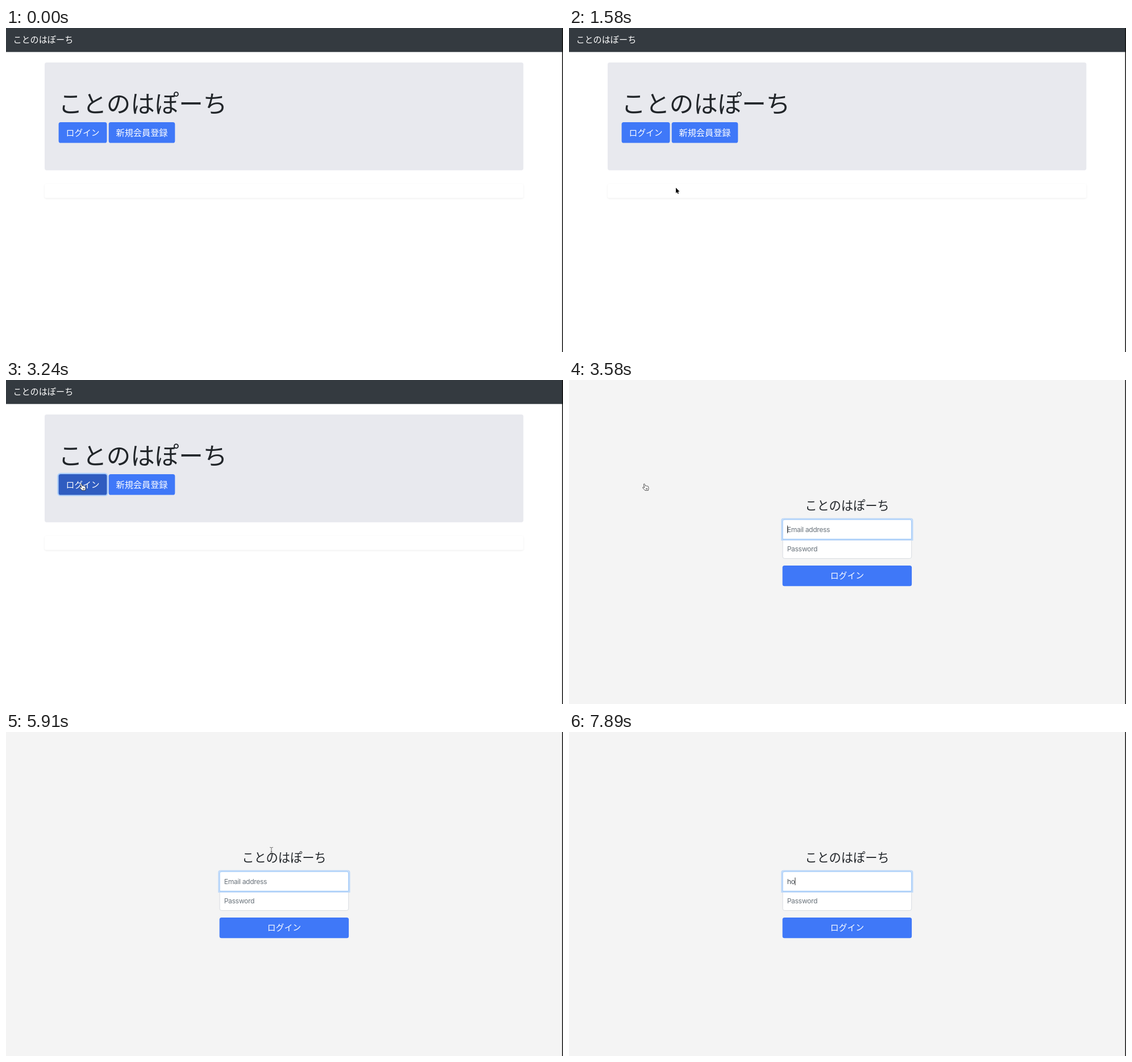
An HTML page for the animation above (7990 ms loop, 980x571 px).

```html
<!DOCTYPE html>
<html lang="ja">
<head>
<meta charset="utf-8">
<title>ログイン</title>
<style>
  html, body { margin: 0; width: 100%; height: 100%; overflow: hidden; background: #fff; }
  svg { display: block; }
  text { font: 15.17px "Noto Sans CJK JP", "Noto Sans CJK", sans-serif; fill: #212529; }
  .light { fill: #fff; }
  .mid { text-anchor: middle; }
  .katakana { font-size: 14.8px; }
  .hero { font-size: 42.5px; }
  .heading { font-size: 21.24px; }
  .field { font: 12.14px Inter, sans-serif; letter-spacing: -.028em; fill: #6c757d; }
  .typed { fill: #495057; }
  .primary { fill: #3f78f8; }
  .card { fill: #fff; filter: drop-shadow(0 1.5px 1.5px rgba(0, 0, 0, .075)); }
  .ring { fill: none; stroke: #a9cdfb; stroke-width: 2.4; }
</style>
</head>
<body>
<svg width="980" height="571" viewBox="0 0 980 571">
  <g id="home">
    <rect width="980" height="571" fill="#fff"/>
    <rect width="980" height="42.3" fill="#343a40"/>
    <text class="light" x="12.4" y="26.3">ことのはぽーち</text>
    <rect x="68" y="60.7" width="842.3" height="190" rx="3.6" fill="#e8e9ee"/>
    <text class="hero" x="92.3" y="149">ことのはぽーち</text>
    <rect id="ring" class="ring" x="91.5" y="165" width="87" height="38.4" rx="4.5"/>
    <rect id="login" x="92.6" y="166" width="84.9" height="36.5" rx="3.6"/>
    <text class="light mid katakana" x="135" y="189.8">ログイン</text>
    <rect class="primary" x="180.7" y="166" width="116.6" height="36.5" rx="3.6"/>
    <text class="light mid" x="239" y="189.8">新規会員登録</text>
    <rect class="card" x="68" y="275" width="842.3" height="24.4" rx="3"/>
  </g>
  <g id="form">
    <rect width="980" height="571" fill="#f4f4f4"/>
    <text class="heading mid" x="489.4" y="228.6">ことのはぽーち</text>
    <path d="M376 280.5H602.7V311.2Q602.7 314.6 599.3 314.6H379.4Q376 314.6 376 311.2Z" fill="#fff" stroke="#ced4da" stroke-width=".8"/>
    <text class="field" x="383.7" y="301.8">Password</text>
    <path d="M374.4 281.9V247.6Q374.4 244.6 377.4 244.6H601.3Q604.3 244.6 604.3 247.6V281.9Z" fill="#fff" stroke="#bfd9f8" stroke-width="2.4"/>
    <path d="M376 280.4V249Q376 246 379 246H599.7Q602.7 246 602.7 249V280.4Z" fill="#fff" stroke="#86bbf8" stroke-width=".9"/>
    <text id="email" class="field" x="383.7" y="267.8"></text>
    <rect id="caret" y="256.5" width="1" height="13.5" fill="#333"/>
    <rect class="primary" x="375.6" y="327" width="227.5" height="36.3" rx="3.6"/>
    <text class="light mid katakana" x="489.4" y="350.2">ログイン</text>
  </g>
  <g id="cursor">
    <path id="arrow" d="M0 0V9.4L2.1 7.5 3.5 10.7 5 10 3.6 6.9 6.5 6.7Z" fill="#000" stroke="#fff" stroke-width=".8" paint-order="stroke"/>
    <path id="hand" transform="translate(-3.2 -.8)" d="M4 7.8L2.6 2.6Q2.3 1 3.4.8Q4.3.7 4.7 2L5.5 4.6Q6.6 3.8 7.3 4.8Q8.4 4 9 5Q10.4 4.4 10.9 6Q11.8 9 10.6 12.4H5Q3.8 10.4 1.2 8.4Q.2 7.2 1.3 6.6Q2.4 6.4 4 7.8ZM7 8.2V10.8M8.5 8.2V10.8" fill="#fff" stroke="#222" stroke-width=".8"/>
    <path id="beam" d="M-2.8-5.2Q-.4-5.2 0-4.2Q.4-5.2 2.8-5.2M0-4.2V4.2M-2.8 5.2Q-.4 5.2 0 4.2Q.4 5.2 2.8 5.2M-1.3 2.2H1.3" fill="none" stroke="#444" stroke-width=".8"/>
  </g>
  <rect x="978.5" width="1.5" height="571" fill="#111"/>
</svg>
<script>
const LOOP = 7990, SUBMIT = 3580;
const $ = id => document.getElementById(id);
const show = (id, on) => $(id).setAttribute('visibility', on ? 'visible' : 'hidden');
const clamp = v => Math.min(1, Math.max(0, v));
const mix = (a, b, p) => a.map((v, i) => v + (b[i] - v) * p);
const inside = ([x, y], l, t, r, b) => x > l && x < r && y > t && y < b;

// Pointer moves: start ms, end ms, number of steps, destination
const origin = [803, 456];
const moves = [
  [800, 1170, 6, [289, 317]],
  [1330, 1580, 4, [188, 281.5]],
  [1730, 2340, 13, [132, 183]],
  [3910, 4310, 6, [474, 326]],
  [4390, 4550, 3, [463, 262]],
  [5430, 5550, 3, [467, 208.5]]
];
const blinks = [3910, 4410, 4910, 5430, 5910, 6410, 6930, 7410];

function pointer(t) {
  let at = origin;
  for (const [start, end, steps, to] of moves) {
    if (t < start) break;
    const step = Math.floor(clamp((t - start) / (end - start)) * (steps - 1) + 1e-6) + 1;
    at = mix(at, to, Math.sin(step / steps * Math.PI / 2));
  }
  return at;
}

function cursorKind(t, at) {
  if (t < SUBMIT) return inside(at, 92, 165, 178, 203) ? 'hand' : 'arrow';
  if (t < 3910) return 'hand';
  const overText = inside(at, 376, 246, 603, 315) || inside(at, 416, 205, 563, 235);
  return overText ? 'beam' : 'arrow';
}

function draw(t) {
  const home = t < SUBMIT;
  show('home', home);
  show('form', !home);

  const hover = clamp((t - 2090) / 150), press = clamp((t - 3040) / 200);
  const blue = mix(mix([63, 120, 248], [50, 101, 204], hover), [47, 92, 192], press);
  $('login').setAttribute('fill', `rgb(${blue.map(Math.round)})`);
  $('ring').setAttribute('opacity', press);

  const typed = t < 7840 ? '' : t < 7890 ? 'h' : 'ho';
  $('email').textContent = typed || 'Email address';
  $('email').classList.toggle('typed', typed !== '');
  $('caret').setAttribute('x', [384, 391, 397.4][typed.length]);
  show('caret', !home && blinks.filter(b => t >= b).length % 2 === 0);

  const at = pointer(t), kind = cursorKind(t, at);
  const visible = t >= 800 && t < 7550;
  $('cursor').setAttribute('transform', `translate(${at})`);
  for (const k of ['arrow', 'hand', 'beam']) show(k, visible && k === kind);
}

const begin = performance.now();
function tick() {
  draw((performance.now() - begin) % LOOP);
  requestAnimationFrame(tick);
}
tick();
</script>
</body>
</html>
```
